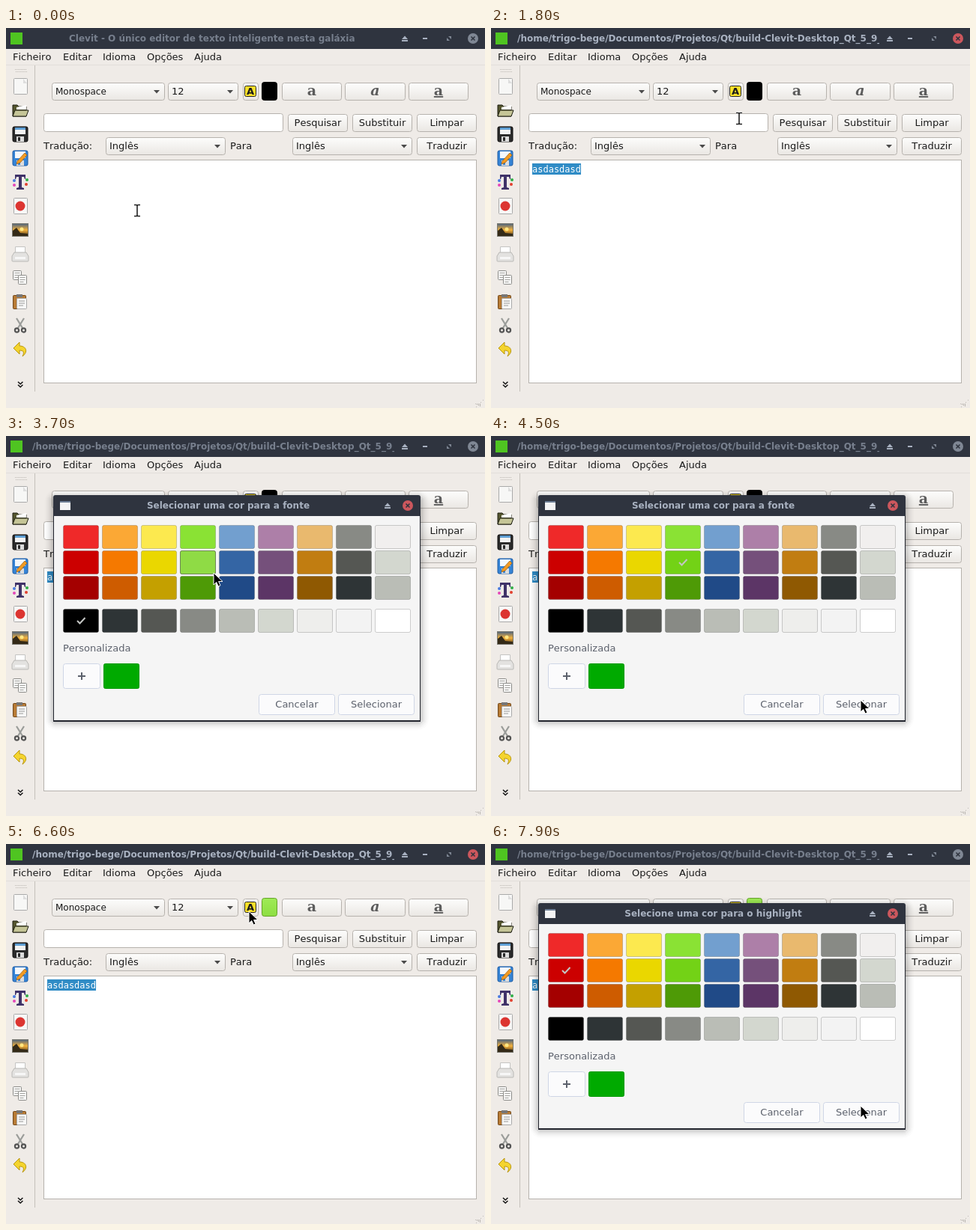
Recreate the animation shown at these times as an HTML page. Size 639x508 px, loop 8000 ms.

```html
<!DOCTYPE html>
<html lang="pt">
<head>
<meta charset="utf-8">
<title>Editor de texto</title>
<style>
  html, body { margin: 0; width: 100%; height: 100%; overflow: hidden; background: #efebe7; }
  svg { display: block; width: 639px; height: 508px; }
  text { font: 13px "DejaVu Sans", sans-serif; font-kerning: none; fill: #1a1a1a; white-space: pre; }
  .title { font-size: 12px; font-weight: bold; fill: #a9b2c1; }
  .mono { font: 12px "DejaVu Sans Mono", monospace; }
  .format { font: bold 19px "DejaVu Serif", serif; fill: #5c5c5c; }
  .dialog { fill: #5c616c; }
  .mid { text-anchor: middle; }
</style>
</head>
<body>
<svg id="stage" viewBox="0 0 639 508"></svg>
<script>
const LOOP = 8000, STEP = 100;
const stage = document.getElementById('stage');

// Markup helpers
const rect = (x, y, w, h, fill, extra = '') =>
  `<rect x="${x}" y="${y}" width="${w}" height="${h}" fill="${fill}" ${extra}/>`;
const path = (d, fill, extra = '') => `<path d="${d}" fill="${fill}" ${extra}/>`;
const line = (d, color, width = 1) => path(d, 'none', `stroke="${color}" stroke-width="${width}"`);
const circle = (x, y, r, fill, extra = '') => `<circle cx="${x}" cy="${y}" r="${r}" fill="${fill}" ${extra}/>`;
const text = (x, y, s, cls = '', extra = '') => `<text x="${x}" y="${y}" class="${cls}" ${extra}>${s}</text>`;
const group = (id, body, extra = '') => `<g id="${id}" ${extra}>${body}</g>`;
const box = (x, y, w, h, fill = 'url(#face)', stroke = '#b6b2ad', r = 3) =>
  rect(x + .5, y + .5, w - 1, h - 1, fill, `stroke="${stroke}" rx="${r}"`);
const button = (x, y, w, label) => box(x, y, w, 24) + text(x + w / 2, y + 16, label, 'mid');
const combo = (x, y, w, label, size = 13) => box(x, y, w, 24) +
  text(x + 5, y + 16, label, '', `style="font-size:${size}px"`) +
  path(`M${x + w - 15} ${y + 10}h8l-4 4.5z`, '#4a4a4a');
const eject = (x, y) => path(`M${x - 4} ${y + 1}l4-4.5 4 4.5zM${x - 4} ${y + 2}h8v2h-8z`, '#a9b2c1');
const closeButton = (id, x, y) => circle(x, y, 7, '#cc575d', `id="${id}"`) +
  line(`M${x - 2.5} ${y - 2.5}l5 5m0-5l-5 5`, '#2f343f', 1.6);

const gradient = (id, ...colors) => `<linearGradient id="${id}" x2="0" y2="1">` +
  colors.map((c, i) => `<stop offset="${i / (colors.length - 1)}" stop-color="${c}"/>`).join('') + '</linearGradient>';
const defs = '<defs>' + gradient('face', '#fdfdfc', '#eae7e3') + gradient('greenFace', '#9feb57', '#8dde42') +
  gradient('sunset', '#4a6280', '#f3b13c', '#4d3415') +
  `<clipPath id="titleClip">${rect(30, 0, 488, 28, '#000')}</clipPath></defs>`;

const page = (x, y, w, h, fill = '#f7f7f6', stroke = '#aaa') => rect(x, y, w, h, fill, `stroke="${stroke}" rx="1"`);
const floppy = (body, edge, label) => rect(-10, -10, 20, 20, body, `stroke="${edge}" rx="2"`) +
  rect(-7, -9, 14, 9, label) + rect(-5, 3, 10, 7, '#dcdcdc') + rect(-3, 4, 3, 5, body);

const icons = [
  page(-8.5, -10.5, 18, 21) + path('M4-10v6h5z', '#ddd'),
  path('M-10 8V-7h6l2 2h10V8z', '#55562f', 'stroke="#1c1d10"') + path('M-5-4L8-7v6H-5z', '#fff') +
    path('M-10 8l3-8h18l-3 8z', '#c5c597', 'stroke="#1c1d10"'),
  floppy('#2b2b2b', '#0c0c0c', '#f2f2f2') + rect(-7, -9, 14, 3, '#5f9fd4'),
  floppy('#3584d6', '#1c5aa3', '#f4f8fc') + path('M-4 4L6-7l3 3L0 6l-5 2z', '#f39b22', 'stroke="#965a12" stroke-width=".7"'),
  path('M-7-10H7v6H6L5-7H2V7l3 1v2H-5V8l3-1V-7h-3l-1 3h-1z', '#3f3268') +
    circle(-8, -2, 2, '#4a7be0') + circle(-8, 4, 2, '#e447b9') + circle(9, -3, 2, '#2fae45') + circle(8, 3, 2, '#e2402e'),
  page(-8.5, -10.5, 18, 21) + circle(0, 0, 6.5, '#dc3531'),
  rect(-10.5, -8.5, 21, 17, 'url(#sunset)', 'stroke="#77776f"') + circle(2, -1, 2.5, '#ffe681') +
    path('M-10 8V1l5-4 5 7 10 1v3z', '#342a17'),
  path('M-6.5-.5v-9h13v9', '#fff', 'stroke="#c4c4c2"') +
    path('M-8-2H8l3 5v6q0 1-1 1h-20q-1 0-1-1V3z', '#e3e2e0', 'stroke="#b9b8b5"') + rect(-7, 4, 14, 3, '#f7f7f7'),
  [[-9.5, -9.5], [-2.5, -3.5]].map(([x, y]) => page(x, y, 11, 12, '#f7f7f6', '#8d8d8a') +
    line(`M${x + 2} ${y + 3}h7m-7 3h7m-7 3h5`, '#a3a3a0')).join(''),
  rect(-9.5, -8.5, 17, 18, '#b87b35', 'stroke="#70481c" rx="1"') + rect(-5, -10, 8, 4, '#777') +
    page(-4.5, -4.5, 13, 14) + line('M-2-1h8m-8 3h8m-8 3h6', '#999'),
  line('M-5-10L3 3M5-10L-3 3', '#9a9c99', 2.2) + [-4.5, 4.5].map(x =>
    circle(x, 6, 2.6, 'none', 'stroke="#555" stroke-width="2.2"')).join(''),
  path('M-9-2l8-8v5c9 0 12 8 4 14 3-6 1-8-4-8v5z', '#f4d42e', 'stroke="#b89610"'),
];

function mainWindow() {
  const menus = [[9, 'Ficheiro'], [76, 'Editar'], [129, 'Idioma'], [188, 'Opções'], [251, 'Ajuda']];
  const formats = [[368, 80, ''], [452, 81, 'font-style:italic'], [537, 80, 'text-decoration:underline']];
  const dots = (x, y, n) => Array.from({ length: n }, (_, i) => rect(x + 2 * i, y, 1, 1, '#bbb7b2')).join('');
  return rect(0, 0, 639, 508, '#efebe7') + rect(0, 0, 639, 28, '#2f343f') +
    rect(6, 6, 16, 16, '#4fc421') +
    text(84, 18, 'Clevit - O único editor de texto inteligente nesta galáxia', 'title', 'id="nameTitle"') +
    `<g clip-path="url(#titleClip)">${text(35, 18,
      '/home/trigo-bege/Documentos/Projetos/Qt/build-Clevit-Desktop_Qt_5_9_', 'title', 'id="pathTitle"')}</g>` +
    eject(532, 14) + rect(556, 13, 6, 2, '#a9b2c1') +
    path('M590 11h4v4zM588 13v4h4z', '#7f8794') + closeButton('mainClose', 623, 14) +
    menus.map(([x, s]) => text(x, 43, s)).join('') +
    line('M0 49.5H639', '#e2deda') + line('M38.5 50V486', '#c4c0bb') + dots(12, 55, 8) + dots(13, 58, 8) +
    icons.map((body, i) => `<g transform="translate(19 ${78 + 32 * i})">${body}</g>`).join('') +
    line('M16 473l3.2 3 3.2-3m-6.4 4l3.2 3 3.2-3', '#111', 1.5) +
    [0, 1, 2, 3].map(i => dots(636 - 3 * i, 497 + 3 * i, 1) + dots(632 - 2 * i, 505 - i, i + 1)).join('') +
    combo(61, 73, 151, 'Monospace', 12) + combo(216, 73, 94, '12') +
    box(316, 73, 21, 24) + rect(318.5, 77.5, 15, 14, '#f8df2a', 'stroke="#222" rx="2"') +
    text(326, 89, 'A', 'mid', 'style="font-weight:bold"') +
    rect(341.5, 72.5, 20, 24, '#000', 'id="fontColor" stroke="#000" rx="3"') +
    formats.map(([x, w, style]) => box(x, 73, w, 24) + text(x + w / 2, 90, 'a', 'format mid', `style="${style}"`)).join('') +
    box(50, 114, 320, 25, '#fff') + button(376, 115, 80, 'Pesquisar') +
    button(462, 115, 80, 'Substituir') + button(548, 115, 80, 'Limpar') +
    text(50, 162, 'Tradução:') + combo(133, 146, 160, 'Inglês') + text(299, 162, 'Para') +
    combo(382, 146, 160, 'Inglês') + button(548, 146, 80, 'Traduzir') +
    box(50, 176, 578, 299, '#fff', '#b6b2ad', 0) +
    rect(55, 181, 0, 15, '#308cc6', 'id="selection"') + text(55, 193, '', 'mono', 'id="typed"') +
    rect(55, 181, 1, 15, '#000', 'id="caret"');
}

const palette = [
  'ef2929 fba835 fce94f 8ae234 729fcf ad7fa8 e9b96e 888a85 f1efee',
  'cc0000 f57900 ead700 73d216 3465a4 75507b c17d11 555753 d3d7cf',
  'a40000 ce5c00 c4a000 4e9a06 204a87 5c3566 8f5902 2e3436 babdb6',
  '000000 2e3436 555753 888a85 babdb6 d3d7cf eeeeec f3f3f3 ffffff',
].map(row => row.split(' ').map(c => '#' + c));
const rowTop = [119, 153, 187, 231];
const cellX = col => 76 + 52 * col;

function dialogWindow() {
  const shadow = Array.from({ length: 13 }, (_, i) => rect(62.5 - i, 82.5 - i, 491 + 2 * i, 300 + 2 * i, 'none',
    `stroke="#000" stroke-opacity="${.2 * (1 - i / 13) ** 2}" rx="${3 + i}"`)).join('');
  const cells = palette.map((row, r) => row.map((c, i) =>
    box(cellX(i), rowTop[r], 48, 32, c, 'rgba(0,0,0,.18)', 2)).join('')).join('');
  const flatButton = (x, w, label) => box(x, 345, w, 28, '#fbfbfc', '#cfd6e6') +
    text(x + w / 2, 363, label, 'dialog mid');
  return shadow +
    group('content', rect(64, 107, 488, 273, '#f5f5f5') + cells +
      rect(0, 0, 47, 31, 'rgba(255,255,255,.2)', 'id="hover" stroke="rgba(0,0,0,.3)" rx="2"') +
      path('M-5 0l3.5 3.5L5.5-4', 'none', 'id="check" stroke="#c4c6c4" stroke-width="2"') +
      text(76, 288, 'Personalizada', 'dialog') +
      box(76, 304, 50, 34, '#fbfbfc', '#cfd6e6') + line('M96 321h10m-5-5v10', '#5c616c', 2) +
      box(130, 304, 48, 34, '#00aa00', '#009a00', 2) +
      flatButton(337, 102, 'Cancelar') + flatButton(443, 102, 'Selecionar')) +
    path('M63 107V82q0-3 3-3H550q3 0 3 3V107z', '#2f343f') +
    path('M63 107h1V380H552V107h1V382H63z', '#22252e') +
    rect(72, 87, 14, 12, '#f4f4f4') + rect(72, 87, 14, 2, '#6e7f96') +
    text(296.5, 97, '', 'title mid', 'id="dialogTitle"') +
    eject(509, 93) + closeButton('dialogClose', 536, 93);
}

const cursors = path('M0 0V16l3.7-3.5L6.2 18l2.8-1.2L6.6 11.5H12z', '#000', 'id="arrow" stroke="#fff"') +
  group('beam', ['#fff', '#222'].map((c, i) =>
    line('M-4-7.5h3l1 1 1-1h3M0-7v14M-4 7.5h3l1-1 1 1h3', c, i ? 1.6 : 3.6)).join(''));

stage.innerHTML = defs + mainWindow() + group('dialog', dialogWindow()) + cursors;
const el = Object.fromEntries([...stage.querySelectorAll('[id]')].map(node => [node.id, node]));

const show = (node, on) => node.setAttribute('display', on ? 'inline' : 'none');
const set = (node, attrs) => { for (const k in attrs) node.setAttribute(k, attrs[k]); };
const place = (node, x, y) => set(node, { transform: `translate(${x} ${y})` });

// Pointer path: time, x, y
const route = [
  [0, 175, 244], [100, 175, 246], [600, 175, 246], [700, 182, 249], [900, 210, 240], [1100, 122, 190],
  [1400, 60, 189], [1500, 60, 189], [1800, 331, 121], [2000, 337, 78], [2300, 337, 78], [2800, 355, 91],
  [3300, 355, 91], [3700, 277, 183], [3900, 277, 183], [4400, 493, 352], [4600, 493, 354], [4700, 440, 391],
  [4900, 369, 298], [5100, 369, 296], [5300, 369, 296], [5800, 345, 168], [6300, 324, 90], [6800, 324, 90],
  [7200, 67, 174], [7500, 100, 171], [7600, 100, 171], [7900, 493, 350], [8000, 493, 350],
];
function pointerAt(t) {
  const i = route.findIndex(key => key[0] > t);
  const [t0, x0, y0] = route[i - 1], [t1, x1, y1] = route[i];
  const k = (t - t0) / (t1 - t0);
  return [Math.round(x0 + (x1 - x0) * k), Math.round(y0 + (y1 - y0) * k)];
}

function render(time) {
  const t = Math.floor(time % LOOP / STEP) * STEP;
  const [x, y] = pointerAt(t);
  const first = t >= 3200 && t < 4600, second = t >= 6700, open = first || second;
  const active = t >= 100 && !open;

  // Main window
  show(el.nameTitle, t < 400);
  show(el.pathTitle, t >= 400);
  for (const node of [el.nameTitle, el.pathTitle]) node.style.fill = active ? '#a9b2c1' : '#777f8d';
  set(el.mainClose, { fill: active ? '#cc575d' : '#7f8794' });
  const green = t >= 4600;
  set(el.fontColor, { fill: green ? 'url(#greenFace)' : '#000', stroke: green ? '#65a32a' : '#000' });

  // Typing and selecting
  const typed = 'asdasdasd'.slice(0, t < 400 ? 0 : t < 500 ? 5 : 9);
  el.typed.textContent = typed;
  const selected = t < 1100 ? 0 : Math.min(9, Math.round((t - 1100) / 300 * 9));
  set(el.selection, { x: 55 + (9 - selected) * 7.225, width: selected * 7.225 });
  el.typed.style.fill = selected > 4 ? '#fff' : '#111';
  show(el.caret, t >= 100 && t < 1100);
  set(el.caret, { x: 55 + Math.round(typed.length * 7.225) });

  // Colour dialog
  show(el.dialog, open);
  show(el.content, (first && t >= 3300) || t >= 6800);
  el.dialogTitle.textContent = second ? 'Selecione uma cor para o highlight' : 'Selecionar uma cor para a fonte';
  const [checkCol, checkRow] = first && t >= 3900 ? [3, 1] : t >= 7700 ? [0, 1] : [0, 3];
  place(el.check, cellX(checkCol) + 24, rowTop[checkRow] + 16);
  const col = Math.floor((x - 76) / 52), row = rowTop.findIndex(top => y >= top && y < top + 32);
  const hovering = row >= 0 && col >= 0 && col < 9 && (x - 76) % 52 < 48;
  show(el.hover, hovering);
  if (hovering) place(el.hover, cellX(col) + .5, rowTop[row] + .5);

  // Pointer shape depends on what lies below it
  const overEditor = x > 50 && x < 628 && y > 176 && y < 475;
  const overSearch = x > 50 && x < 370 && y > 114 && y < 139;
  const beam = !open && (overEditor || overSearch);
  show(el.beam, beam);
  show(el.arrow, !beam);
  place(beam ? el.beam : el.arrow, x, y);
}

const start = performance.now();
function tick() {
  render(performance.now() - start);
  requestAnimationFrame(tick);
}
tick();
</script>
</body>
</html>
```
